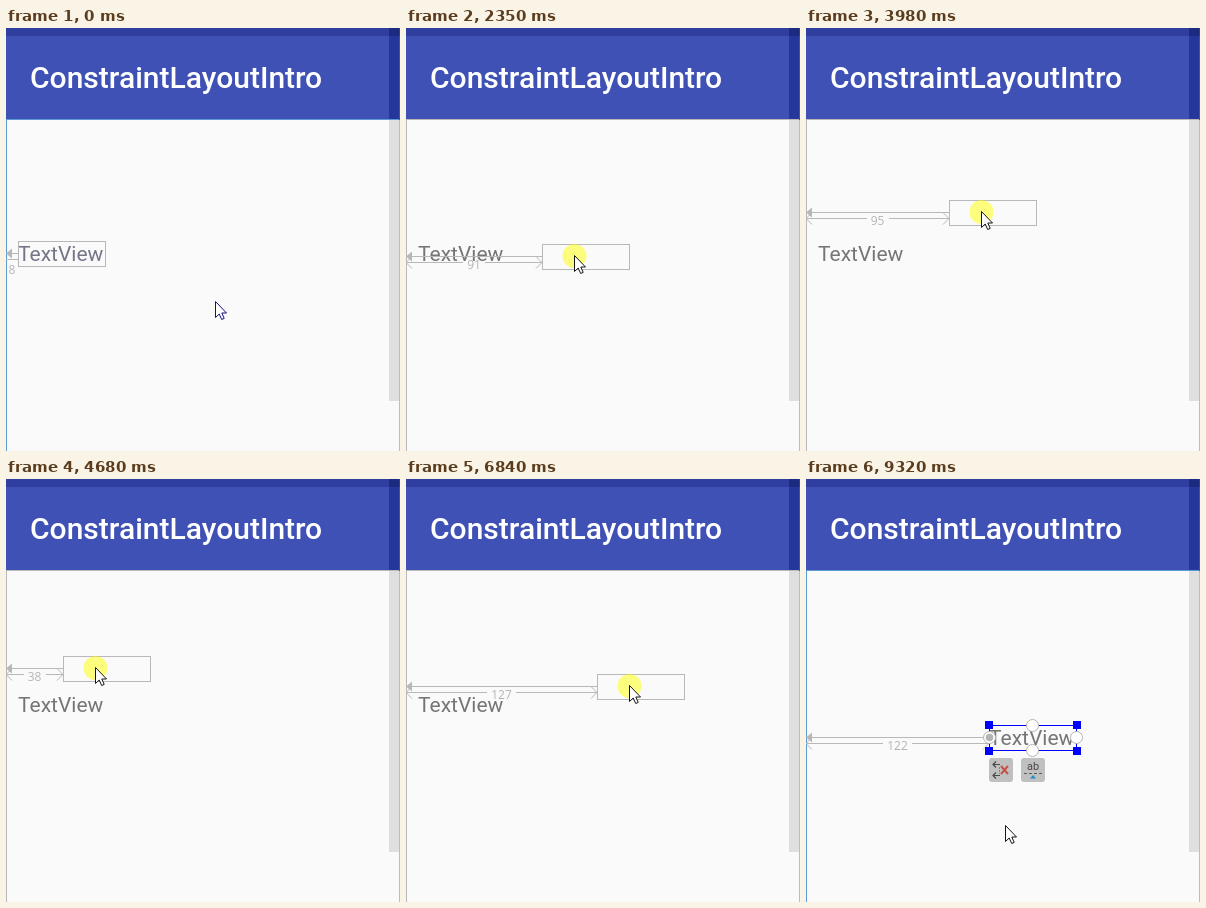
Write an HTML page that moves like this. It is 394 px wide and 423 px high and loops after 9.4 s.

```html
<!DOCTYPE html>
<html lang="en">
<head>
<meta charset="utf-8">
<title>Dragging a constrained view</title>
<style>
html, body { margin: 0; width: 100%; height: 100%; overflow: hidden; background: #fafafa; }
svg { display: block; width: 394px; height: 423px; font-family: Roboto, sans-serif; }
.crisp { shape-rendering: crispEdges; }
.label { font: 21px Roboto, sans-serif; }
.number { font: 12px "Open Sans", sans-serif; fill: #b4b4b4; text-anchor: middle; }
</style>
</head>
<body>
<svg viewBox="0 0 394 423">
  <rect width="394" height="423" fill="#fafafa"/>
  <rect width="394" height="92" fill="#3f51b5"/>
  <rect width="394" height="8" fill="#303f9f"/>
  <text x="24" y="60" font-size="30" font-weight="500" fill="#fff">ConstraintLayoutIntro</text>
  <g class="crisp">
    <rect x="383" y="92" width="10" height="281" fill="#dfdfdf"/>
    <rect x="383" width="10" height="92" fill="#26379b"/>
    <rect x="383" width="10" height="8" fill="#1c2a80"/>
    <path d="M393.5 92V423" stroke="#bdbdbd"/>
    <path id="edge" d="M.5 423V91.5H393" fill="none"/>
  </g>

  <text id="label" class="label">TextView</text>

  <g id="constraint">
    <path id="lines" class="crisp" fill="none" stroke="#b8b8b8"/>
    <path id="chevrons" fill="none" stroke="#b8b8b8"/>
    <path d="M0 12.5L6 7.5V17.5Z" fill="#b8b8b8"/>
    <text id="number" class="number"></text>
  </g>

  <g id="box">
    <rect id="outline" class="crisp" x=".5" y=".5" width="87" height="25" fill="none"/>
    <g id="selection">
      <g id="corners" class="crisp" fill="#00f"></g>
      <g id="handles" fill="#fff" stroke="#b4b4b4"></g>
      <circle cx=".5" cy="12.5" r="3.8" fill="#b4b4b4"/>
      <rect y="33" width="24" height="24" rx="3" fill="#c0c0c0"/>
      <path d="M4 39.5H11M7 36.5L4 39.5L7 42.5M4 50.5H11M7 47.5L4 50.5L7 53.5" fill="none" stroke="#4a4a4a" stroke-width="1.2"/>
      <path d="M10.500 42.500V49" stroke="#4a4a4a" stroke-dasharray="1 2"/>
      <path d="M12 41L19 49M19 41L12 49" stroke="#c94f45" stroke-width="1.9"/>
      <rect x="32" y="33" width="24" height="24" rx="3" fill="#c0c0c0"/>
      <text x="44" y="45" font-size="11" fill="#4a4a4a" text-anchor="middle">ab</text>
      <path class="crisp" d="M35 48.500H53" stroke="#5a5a5a" stroke-dasharray="3 2"/>
      <path d="M41 53.500L44 50L47 53.500Z" fill="#188fc9"/>
    </g>
  </g>

  <circle id="press" r="12" fill="#ff0" fill-opacity=".5"/>
  <path id="cursor" d="M.5 .5V16.500L4.200 13L6.700 18.500L9.200 17.400L6.800 12H11.500Z" fill="#fff" stroke-width="1"/>
</svg>
<script>
const LOOP = 9400, PRESS = 1370, DRAG = 1600, DROP = 8080, REFRESH = 8230;
const START = [12, 213], GRIP = [32, 11], WIDTH = 88, HEIGHT = 26;

// Each move: first step time, last step time, step count, x, y.
const boxMoves = [
  [1600, 2350, 11, 136, 216], [2430, 2510, 2, 147, 212], [2580, 3050, 7, 211, 168],
  [3590, 4520, 13, 61, 177], [4590, 4680, 2, 57, 177],
  [5140, 5910, 11, 165, 189], [5990, 6060, 2, 186, 189], [6140, 6140, 1, 192, 189],
  [6840, 7300, 7, 183, 246]
];
const hoverMoves = [[70, 200, 3, 217, 281], [370, 820, 7, 43, 223], [1140, 1200, 2, 44, 224]];
const leaveMoves = [[9180, 9320, 3, 199, 346]];

const $ = id => document.getElementById(id);
const set = (id, attrs) => {
  for (const name in attrs) $(id).setAttribute(name, attrs[name]);
};
const show = (id, on) => set(id, { visibility: on ? "visible" : "hidden" });
const place = (id, x, y) => set(id, { transform: `translate(${x} ${y})` });
const ease = u => (u + u * u * (3 - 2 * u)) / 2;

function follow(start, moves, t) {
  let [x, y] = start;
  for (const [t0, t1, count, toX, toY] of moves) {
    if (t < t0) break;
    const done = t >= t1 ? count : Math.floor((t - t0) / (t1 - t0) * (count - 1) + 1.01);
    const u = ease(done / count);
    x += (toX - x) * u;
    y += (toY - y) * u;
  }
  return [Math.round(x), Math.round(y)];
}

function drawConstraint(x, y) {
  const text = String(Math.round(x / 1.5));
  const half = text.length * 3.5 + 4;
  const roomy = x > 2 * half + 12;
  const mid = x / 2;
  const measure = roomy ? `M0 18.5H${mid - half}M${mid + half} 18.5H${x}` : `M0 18.5H${x}`;
  place("constraint", 0, y);
  set("lines", { d: `M0 12.5H${x}` + measure });
  set("chevrons", { d: roomy ? `M6 12.5L0 18.5L6 24.5M${x - 6} 12.5L${x} 18.5L${x - 6} 24.5` : "" });
  set("number", { x: mid, y: roomy ? 25 : 33 });
  $("number").textContent = text;
}

function draw(t) {
  const [x, y] = follow(START, boxMoves, t);
  const grip = [x + GRIP[0], y + GRIP[1]];
  const dragging = t >= DRAG && t < DROP;
  const [cx, cy] = t < DRAG ? follow([209, 273], hoverMoves, t) : follow(grip, leaveMoves, t);
  const inside = cx >= x && cx < x + WIDTH && cy >= y && cy < y + HEIGHT;
  const over = dragging || inside;
  const selected = t >= DROP;

  set("edge", { stroke: over ? "#b8b8b8" : "#5b9bd5" });
  const [lx, ly] = t < REFRESH ? START : [x, y];
  set("label", { x: lx, y: ly + 20, fill: t < DRAG ? "#747587" : "#757575" });
  drawConstraint(x, y);
  place("box", x, y);
  set("outline", { stroke: selected ? "#00f" : "#b8b8b8" });
  show("selection", selected);
  show("press", t >= PRESS && t < DROP);
  place("press", grip[0] + .5, grip[1] + 1);
  place("cursor", cx, cy);
  set("cursor", { stroke: t < 370 ? "#101080" : "#151515" });
}

$("corners").innerHTML = [[-4, -4], [84, -4], [-4, 22], [84, 22]]
  .map(([x, y]) => `<rect x="${x}" y="${y}" width="8" height="8"/>`).join("");
$("handles").innerHTML = [[.5, 12.5], [87.5, 12.5], [43.5, .5], [43.5, 25.5]]
  .map(([x, y]) => `<circle cx="${x}" cy="${y}" r="6"/>`).join("");

const begin = performance.now();
function tick() {
  draw((performance.now() - begin) % LOOP);
  requestAnimationFrame(tick);
}
tick();
</script>
</body>
</html>
```
